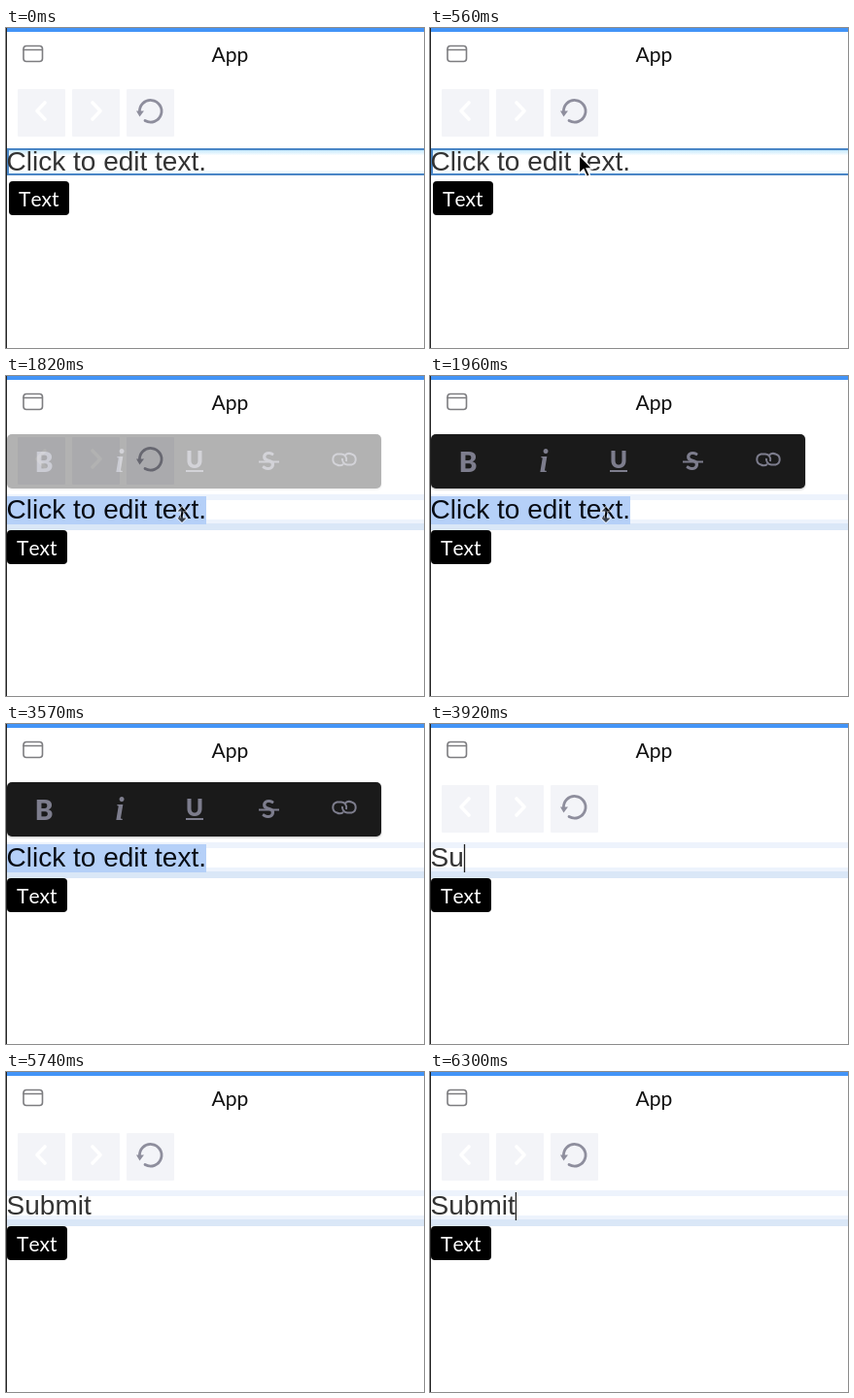
These frames come from a looping animation (430x330 px, 6.51 s). An HTML page:

```html
<!DOCTYPE html>
<html lang="en">
<head>
<meta charset="utf-8">
<title>Inline text editing</title>
<style>
  html, body { margin: 0; width: 100%; height: 100%; overflow: hidden; background: #fff; }
  svg { display: block; }
  .ui { font: 21px Lato, sans-serif; }
  .line { fill: none; stroke-linecap: round; stroke-linejoin: round; }
  #text { font: 28px "Liberation Sans", Arial, sans-serif; }
  #tag .ui { font-kerning: none; }
  #tools { fill: #7d7d8d; }
  #tools .line { fill: none; stroke: #7d7d8d; stroke-width: 2; stroke-linecap: butt; }
  #tools > rect { filter: drop-shadow(0 1px 1px #0004); }
</style>
</head>
<body>
<svg width="430" height="330" viewBox="0 0 430 330">
  <defs>
    <linearGradient id="glow" x2="0" y2="1">
      <stop offset="0" stop-color="#b9e4fc"/>
      <stop offset=".25" stop-color="#fff"/>
      <stop offset=".82" stop-color="#fff"/>
      <stop offset="1" stop-color="#d8eefc"/>
    </linearGradient>
  </defs>

  <rect width="430" height="4" fill="#4394f7"/>
  <g class="line" stroke="#7d7d80" stroke-width="1.6">
    <rect x="18" y="18.5" width="19.5" height="16" rx="3"/>
    <path d="M18 22.500H37"/>
  </g>
  <text class="ui" x="211.5" y="35" fill="#111">App</text>

  <g fill="#f3f4f8">
    <rect x="12" y="63" width="49" height="49" rx="1"/>
    <rect x="68" y="63" width="49" height="49" rx="1"/>
    <rect x="124" y="63" width="49" height="49" rx="1"/>
  </g>
  <path class="line" stroke="#fff" stroke-width="3.6" d="M40 77L32 85.500L40 94M89 77L97 85.500L89 94"/>
  <path class="line" stroke="#8e8e9d" stroke-width="2.800" d="M137.500 87A11.300 11.300 0 1 1 143 95.500"/>
  <path fill="#8e8e9d" d="M134 85.500H142L137.500 91.500Z"/>

  <g id="hover">
    <rect x="2" y="125" width="440" height="26" fill="url(#glow)" stroke="#4a86c6" stroke-width="2"/>
  </g>
  <g id="selected">
    <path fill="#edf3fc" d="M1 122H430V128H1ZM1 148H430V152H1Z"/>
    <path fill="#dae7f7" d="M1 152H430V159H1Z"/>
  </g>
  <rect id="highlight" y="124" width="206" height="29" fill="#b5d0f8"/>
  <text id="text" x=".6" y="147"></text>
  <rect id="caret" y="124" width="1.300" height="29" fill="#222"/>

  <g id="tag">
    <rect x="1" y="159" width="62" height="35" rx="4"/>
    <text class="ui" x="11" y="185" fill="#fff">Text</text>
  </g>

  <g id="tools">
    <rect x="1" y="60" width="385" height="56" rx="5" fill="#1a1a1a"/>
    <g text-anchor="middle" font-family="Lato, sans-serif" font-weight="900">
      <text x="39" y="98.500" font-size="28">B</text>
      <text x="117" y="98.500" font-family="Liberation Serif, serif" font-weight="700" font-style="italic" font-size="33">i</text>
      <text x="194" y="95" font-size="24">U</text>
      <text x="270" y="97" font-weight="700" font-size="26">S</text>
    </g>
    <path class="line" d="M185 98H203M260 88.500H281"/>
    <path class="line" d="M347 91A6 6 0 0 1 340.500 91.500A5.700 5.700 0 0 1 340.500 80.500H345A5.700 5.700 0 0 1 350 88M349 81.500A6 6 0 0 1 355.500 80.500A5.700 5.700 0 0 1 355.500 91.500H351A5.700 5.700 0 0 1 346 85"/>
  </g>

  <path fill="#222" d="M0 0H1V330H0Z"/>
  <path id="arrow" fill="#000" stroke="#fff" stroke-width="1.400" d="M0 0V19L4.500 15L8 22.500L11 21L7.700 14H13.500Z"/>
  <path id="resize" fill="#000" stroke="#fff" stroke-width="1.600" paint-order="stroke" d="M0-8L4.500-3.500H1V3.500H4.500L0 8L-4.500 3.500H-1V-3.500H-4.500Z"/>
</svg>
<script>
const LOOP = 6510, STEP = 70;
const TYPING = [[0, "Click to edit text."], [3640, "S"], [3920, "Su"], [4410, "Sub"],
  [4690, "Subm"], [4970, "Submi"], [5180, "Submit"]];
// Pointer keys: time, x, y
const ENTER = [[70, 212, 221], [350, 172, 158], [630, 150, 126], [770, 173, 141]];
const SETTLE = [[910, 172, 146], [980, 173, 146], [1330, 181, 143]];
const LEAVE = [[5880, 183, 146], [6230, 297, 280]];

const el = id => document.getElementById(id);
const show = (id, opacity) => el(id).setAttribute("opacity", +opacity);
const within = (t, from, to) => t >= from && t < to;

function along(keys, t) {
  const next = keys.findIndex(key => key[0] > t);
  if (next < 0) return keys.at(-1).slice(1);
  const a = keys[Math.max(0, next - 1)], b = keys[next];
  const k = Math.max(0, (t - a[0]) / (b[0] - a[0]));
  const eased = k * k * (3 - 2 * k);
  return [a[1] + (b[1] - a[1]) * eased, a[2] + (b[2] - a[2]) * eased];
}

function place(id, keys, t) {
  el(id).setAttribute("transform", `translate(${along(keys, t)})`);
}

function draw(t) {
  const active = t >= 910;
  const highlighted = within(t, 1820, 3640);
  const text = el("text");
  const value = TYPING.findLast(([start]) => start <= t)[1];
  if (text.textContent !== value) text.textContent = value;
  text.setAttribute("fill", highlighted ? "#080c14" : "#333");

  show("hover", !active);
  show("selected", active);
  el("tag").setAttribute("transform", active ? "" : "translate(2 -1)");
  show("highlight", highlighted);
  show("tools", within(t, 1820, 3920) ? Math.min(1, (t - 1750) / 210) : 0);

  show("caret", t >= 3640 && !within(t, 5740, 6300));
  el("caret").setAttribute("x", text.getComputedTextLength() + .6);

  show("arrow", within(t, 70, 910) || within(t, 5880, 6300));
  place("arrow", active ? LEAVE : ENTER, t);
  show("resize", within(t, 910, 3570) ? (highlighted ? .7 : 1) : 0);
  place("resize", SETTLE, t);
}

function tick() {
  draw(Math.floor(performance.now() % LOOP / STEP) * STEP);
  requestAnimationFrame(tick);
}
tick();
</script>
</body>
</html>
```
